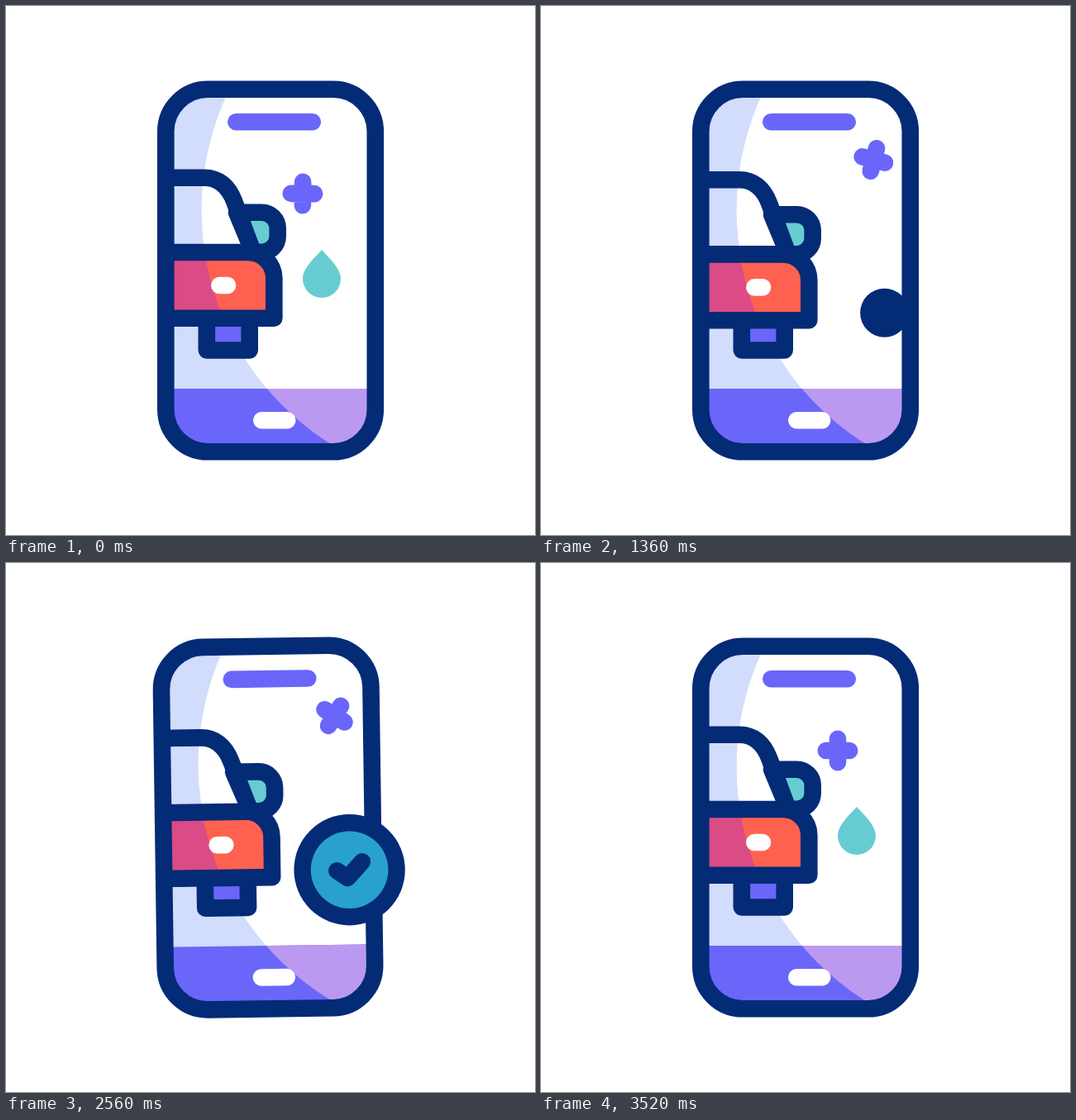
Write an HTML page with a canvas that moves like this. It is 640 by 640 pixels and loops after 3600 ms.

```html
<!DOCTYPE html>
<html lang="en">
<head>
<meta charset="utf-8">
<title>Car wash app</title>
<style>
  html, body { margin: 0; width: 100%; height: 100%; overflow: hidden; background: #fff; }
  canvas { display: block; width: 640px; height: 640px; }
</style>
</head>
<body>
<canvas id="stage"></canvas>
<script>
const LOOP = 3600, REST = 3520, LINE = 20.6;
const NAVY = '#042b76', PURPLE = '#6a66fa', YELLOW = '#ffcc52', TEAL = '#67ccd2';

const canvas = document.getElementById('stage');
const ctx = canvas.getContext('2d');
const ratio = window.devicePixelRatio || 1;
canvas.width = canvas.height = 640 * ratio;

const phase = (t, from, to) => Math.min(1, Math.max(0, (t - from) / (to - from)));
const mix = (a, b, k) => a + (b - a) * k;
const smooth = k => (1 - Math.cos(Math.PI * k)) / 2;

// Eased value at time t through [time, value] keys.
function keyed(t, keys) {
  if (t <= keys[0][0]) return keys[0][1];
  for (let i = 1; i < keys.length; i++) {
    const [t0, v0] = keys[i - 1], [t1, v1] = keys[i];
    if (t < t1) return mix(v0, v1, smooth(phase(t, t0, t1)));
  }
  return keys[keys.length - 1][1];
}

function mixColor(a, b, k) {
  const part = (hex, i) => parseInt(hex.slice(1 + 2 * i, 3 + 2 * i), 16);
  return `rgb(${[0, 1, 2].map(i => Math.round(mix(part(a, i), part(b, i), k)))})`;
}

function fill(path, color) {
  ctx.fillStyle = color;
  ctx.fill(path);
}

function stroke(path, color, width = LINE, cap = 'round') {
  ctx.strokeStyle = color;
  ctx.lineWidth = width;
  ctx.lineCap = cap;
  ctx.lineJoin = 'round';
  ctx.stroke(path);
}

function disc(x, y, r, color) {
  if (r <= 0) return;
  ctx.fillStyle = color;
  ctx.beginPath();
  ctx.arc(x, y, r, 0, 2 * Math.PI);
  ctx.fill();
}

function group(draw) {
  ctx.save();
  draw();
  ctx.restore();
}

// Fills a path in one colour, and in another where the big light circle covers it.
function twoTone(path, dark, light) {
  fill(path, dark);
  group(() => {
    ctx.clip(path);
    disc(571, 247, 334.4, light);
  });
}

const frame = new Path2D();
frame.roundRect(193.3, 100.8, 253.5, 438.5, 51);
const band = new Path2D('M190 463H450V545H190Z');
const notch = new Path2D('M278.3 140.2H370.8');
const homeBar = new Path2D('M309.3 501.3H340.2');
const roof = new Path2D('M193.3 207.8H240C257 207.8 269 218 276 236L299 298');
const mirror = new Path2D('M279 249.8H309.4A19.3 19.3 0 0 1 328.7 269V278.5A19.3 19.3 0 0 1 309.4 297.8H299Z');
const body = new Path2D('M193.3 298H293A31.3 31.3 0 0 1 324.3 329.3V377.8H193.3');
const plate = new Path2D('M258.3 338H268');
const wheel = new Path2D('M242.8 382V416.5H294.7V382');
const drop = new Path2D('M0 0C-8 9-23 22-23 35A23 23 0 0 0 23 35C23 22 8 9 0 0Z');
const plus = new Path2D('M-14.2 0H14.2M0-14.2V14.2');
const check = new Path2D('M400.3 372.3L413.3 381L430.8 361.3');

function drawCar(t, flash) {
  fill(wheel, PURPLE);
  stroke(wheel, NAVY, LINE, 'butt');
  ctx.translate(0, 14.3 * smooth(t / 600));
  fill(mirror, TEAL);
  stroke(mirror, NAVY);
  // The sloping pillar hides the inner part of the mirror.
  stroke(roof, NAVY);
  twoTone(body, '#db4b86', '#ff6150');
  stroke(body, NAVY);
  stroke(plate, mixColor('#ffffff', YELLOW, flash), LINE + 3 * flash);
}

function drawPlus(t) {
  const k = keyed(t, [[0, 0], [320, 1.22], [540, 1], [2980, 1], [3510, 0]]);
  ctx.translate(mix(359, 402.4, k), mix(227, 186, k));
  ctx.rotate(Math.min(0.54 * t, 1890) * Math.PI / 180);
  stroke(plus, PURPLE);
}

function drawDrop(t) {
  let top, alpha = 1;
  if (t < 460) {
    top = mix(295, 147, Math.pow(phase(t, 0, 440), 1.5));
    alpha = 1 - phase(t, 360, 440);
  } else if (t < 1200) {
    const k = phase(t, 530, 1140);
    top = mix(374, 148, k + 0.3 * k * (1 - k));
    alpha = phase(t, 510, 570) * (1 - phase(t, 1070, 1150));
  } else {
    const k = phase(t, 3220, 3520);
    top = mix(374, 295, smooth(k));
    alpha = phase(t, 3220, 3290);
  }
  if (alpha <= 0) return;
  ctx.globalAlpha = alpha;
  ctx.translate(382, top);
  fill(drop, TEAL);
}

function drawPhone(t, flash) {
  const tilt = keyed(t, [[1840, 0], [2033, 2.1], [2418, -2.1], [2800, 2.1], [2955, 0]]);
  ctx.translate(320, 530);
  ctx.rotate(tilt * Math.PI / 180);
  ctx.translate(-320, -530);

  group(() => {
    ctx.clip(frame);
    twoTone(frame, '#d2dcfd', '#ffffff');
    twoTone(band, PURPLE, '#bb99f1');
    group(() => drawDrop(t));
    group(() => drawPlus(t));
    group(() => drawCar(t, flash));
  });
  stroke(notch, mixColor(PURPLE, YELLOW, flash), LINE + 3 * flash);
  stroke(homeBar, mixColor('#ffffff', YELLOW, flash), LINE + 3 * flash);
  stroke(frame, NAVY);
}

function drawBadge(t, flash) {
  const x = 415.6, y = 371.2;
  const outer = keyed(t, [[1170, 0], [1630, 1.19], [1840, 1], [3020, 1], [3320, 0]]);
  const inner = keyed(t, [[1370, 0], [1720, 1.12], [1880, 1], [2990, 1], [3240, 0]]);
  const tick = keyed(t, [[1540, 0], [1800, 1.15], [1940, 1], [2980, 1], [3180, 0]]);
  disc(x, y, (67.2 + 1.5 * flash) * outer, mixColor(NAVY, YELLOW, flash));
  disc(x, y, (46.8 - 1.5 * flash) * inner, '#28a1ce');
  if (tick <= 0) return;
  ctx.translate(x, y);
  ctx.scale(tick, tick);
  ctx.translate(-x, -y);
  stroke(check, NAVY);
}

function render(now) {
  const clock = now % LOOP;
  const t = clock < REST ? clock : 0;
  const flash = keyed(t, [[2600, 0], [2690, 1], [2970, 1], [3060, 0]]);

  ctx.setTransform(ratio, 0, 0, ratio, 0, 0);
  ctx.fillStyle = '#fff';
  ctx.fillRect(0, 0, 640, 640);
  group(() => drawPhone(t, flash));
  group(() => drawBadge(t, flash));
}

const start = performance.now();
function tick() {
  render(performance.now() - start);
  requestAnimationFrame(tick);
}
tick();
</script>
</body>
</html>
```
